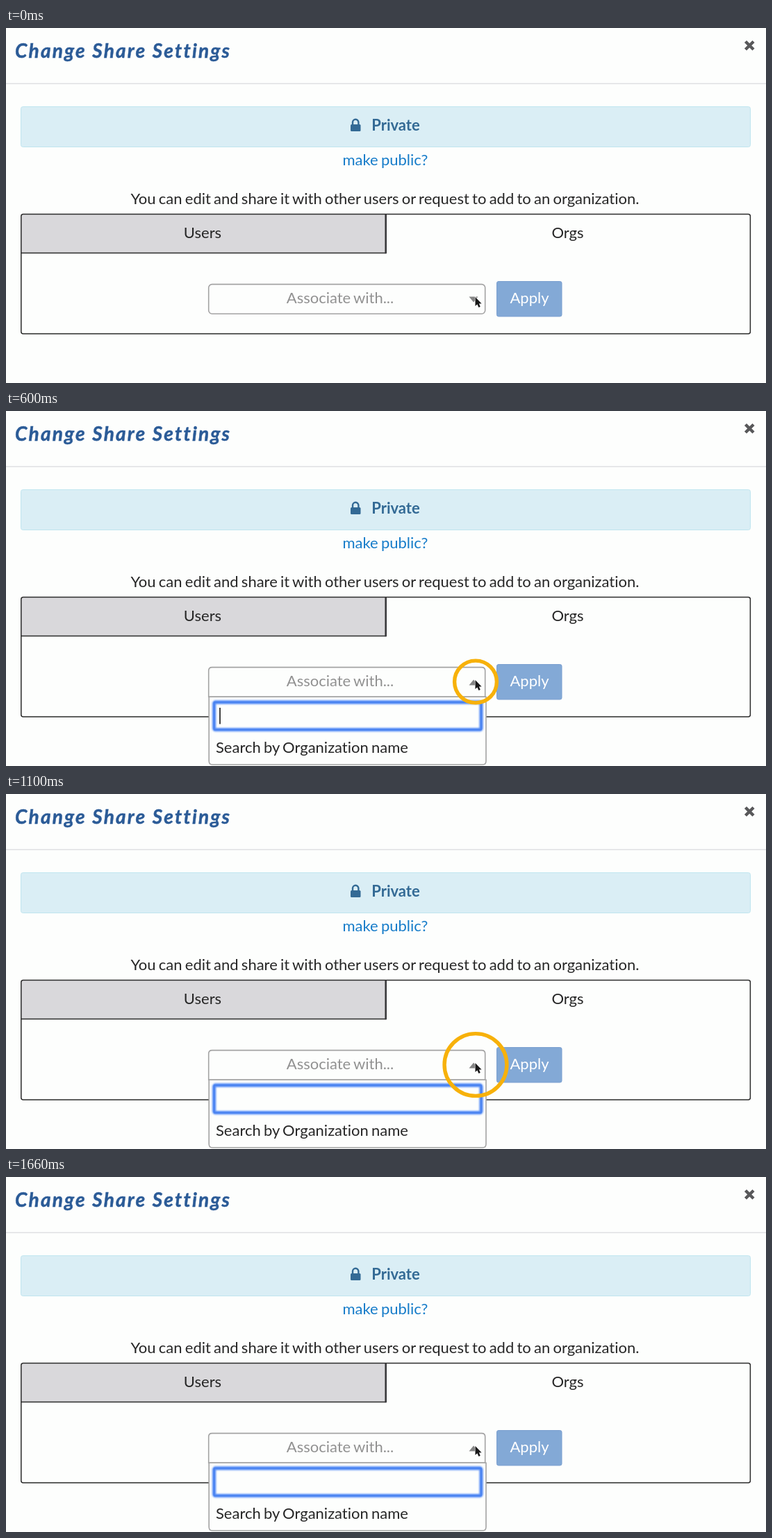
Recreate the animation shown at these times as an HTML page. Size 1094x512 px, loop 1800 ms.

```html
<!DOCTYPE html>
<html lang="en">
<head>
<meta charset="utf-8">
<title>Share settings</title>
<style>
  html, body { margin: 0; height: 100%; overflow: hidden; background: #fdfefd; }
  svg { display: block; width: 100vw; height: 100vh; }
  text { font: 22px Lato, sans-serif; font-variant-ligatures: none; word-spacing: -1.4px; fill: #262626; }
  .mid { text-anchor: middle; }
  .title { font: italic bold 28px Lato, sans-serif; letter-spacing: 2.2px; word-spacing: 0; fill: #2b5b97; stroke: #2b5b97; stroke-width: 0.5; }
  .private { font-weight: bold; fill: #336a95; }
  .link { fill: #167cc9; }
  .hint { fill: #919191; }
  .light { fill: #fff; }
  .panel { fill: none; stroke: #2b2b2b; stroke-width: 1.5; }
  .field { fill: #fdfefd; stroke: #a3a3a3; stroke-width: 1.6; }
</style>
</head>
<body>
<svg viewBox="0 0 1094 512">
  <defs>
    <filter id="glow" x="-5%" y="-30%" width="110%" height="160%">
      <feGaussianBlur stdDeviation="1"/>
    </filter>
  </defs>

  <text class="title" x="13" y="43">Change Share Settings</text>
  <path d="M1064.5 19.5l11.5 11.5m0 -11.5l-11.5 11.5" stroke="#58585a" stroke-width="4.4"/>
  <path d="M0 80.3H1094" stroke="#e0e1e3" stroke-width="1.6"/>

  <rect x="21.5" y="113.5" width="1050" height="58" rx="3" fill="#daeef5" stroke="#bfe5ef"/>
  <rect x="496" y="139" width="14.5" height="10" rx="1.5" fill="#336a95"/>
  <path d="M499 140v-4a4.2 4.2 0 0 1 8.4 0v4" fill="none" stroke="#336a95" stroke-width="2.4"/>
  <text class="mid private" x="561" y="148">Private</text>
  <text class="mid link" x="546" y="197.5">make public?</text>
  <text class="mid" x="545.5" y="254">You can edit and share it with other users or request to add to an organization.</text>

  <path d="M22 269H547V324.5H22z" fill="#d9d8db"/>
  <rect class="panel" x="21.8" y="268.6" width="1049.6" height="172.4" rx="3"/>
  <path class="panel" d="M22 324.6H547"/>
  <path d="M546.7 269V325.3" stroke="#3a3a3c" stroke-width="2.6"/>
  <text class="mid" x="283" y="303">Users</text>
  <text class="mid" x="808.5" y="303">Orgs</text>

  <rect x="706.5" y="365.5" width="93.5" height="50.5" rx="2.5" fill="#83a9d6" stroke="#7a9fd0"/>
  <text class="mid light" x="753.5" y="397">Apply</text>

  <g id="closed">
    <rect class="field" x="291.7" y="369.6" width="398" height="42.6" rx="5"/>
    <path d="M666.5 387.5h13l-6.5 8z" fill="#858585"/>
  </g>
  <g id="open">
    <path class="field" d="M291.7 412.2V374.6q0 -5 5 -5H684.7q5 0 5 5V412.2z"/>
    <path class="field" d="M292.2 412.2H691V505q0 5 -5 5H297.2q-5 0 -5 -5z"/>
    <path d="M666.5 395.5h13l-6.5 -8z" fill="#858585"/>
    <g fill="none" stroke="#5a90f7">
      <rect x="299.6" y="420" width="384.4" height="39.6" rx="2" stroke-width="5.4" filter="url(#glow)"/>
      <rect x="299.6" y="420" width="384.4" height="39.6" rx="1" stroke="#4a83f0" stroke-width="2.4"/>
    </g>
    <text x="302" y="493">Search by Organization name</text>
    <path id="caret" d="M308 428V451.5" stroke="#222" stroke-width="1.7"/>
  </g>
  <text class="mid hint" x="481" y="397">Associate with...</text>

  <circle id="ring" cx="676" cy="390.5" fill="none" stroke="#f7b10a" stroke-width="5.4"/>
  <path d="M675.5 388v13l2.9 -2.5 2 4.4 2.4 -1 -1.9 -4.3h3.7z" fill="#181818" stroke="#fff" stroke-width="1.2" paint-order="stroke"/>
</svg>
<script>
  const LOOP = 1800, OPEN = 5, RING_END = 43, BLINK = 15;
  const [closed, open, caret, ring] =
    ["closed", "open", "caret", "ring"].map(id => document.getElementById(id));
  const show = (element, on) => element.setAttribute("visibility", on ? "inherit" : "hidden");

  function draw(now) {
    // 30 ticks per second, each starting on a 10 ms boundary
    const tick = Math.floor((now % LOOP + 9.99) * 0.03);
    const isOpen = tick >= OPEN;
    show(closed, !isOpen);
    show(open, isOpen);
    show(caret, isOpen && Math.floor((tick - OPEN) / BLINK) % 2 === 0);
    show(ring, isOpen && tick < RING_END);
    // The ring's area grows at a constant rate
    const outer = Math.sqrt(Math.max(0, 2.345 * (tick / 0.03 - 133)));
    ring.setAttribute("r", Math.max(0, outer - 2.7));
    requestAnimationFrame(() => draw(performance.now()));
  }
  draw(0);
</script>
</body>
</html>
```
